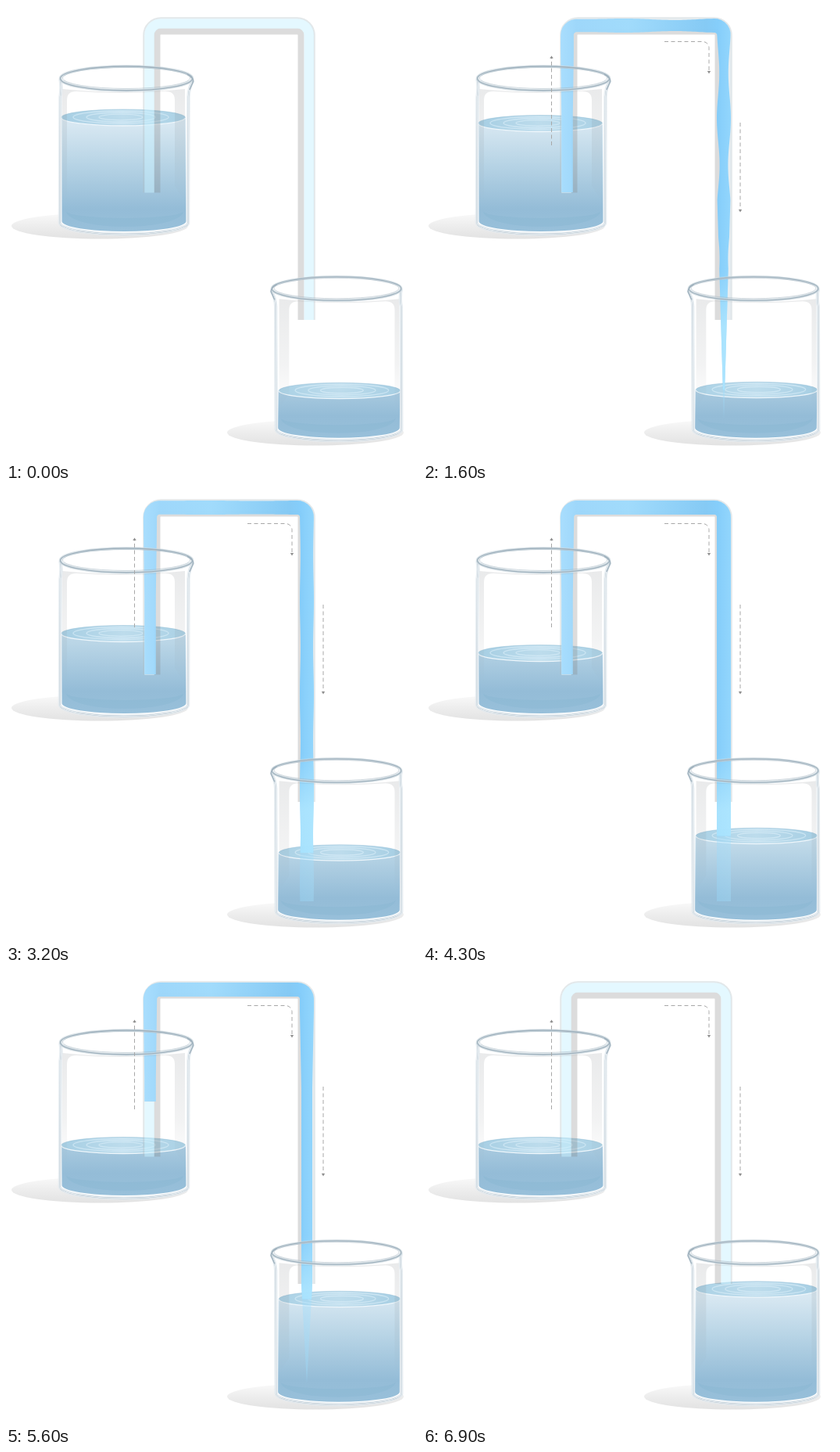
These frames come from a looping animation (526x580 px, 7200 ms). An HTML page with a canvas:

```html
<!DOCTYPE html>
<html lang="en">
<head>
<meta charset="utf-8">
<title>Siphon</title>
<style>
html, body { margin: 0; width: 100%; height: 100%; overflow: hidden; background: #fff; }
canvas { display: block; }
</style>
</head>
<body>
<canvas id="stage" width="526" height="580"></canvas>
<script>
const c = document.getElementById('stage').getContext('2d');
const LOOP = 7200, PI = Math.PI;
const FLIP_SCALE = 0.975, FLIP_Y = 270.9;   // the lower beaker is a mirrored copy
const clamp = (v, a = 0, b = 1) => Math.min(b, Math.max(a, v));

const upperLevel = [[1200, 142.5], [1600, 150], [2400, 166.5], [3200, 186], [4300, 211], [5000, 224]];
const lowerLevel = [[1500, 491.5], [1600, 490.5], [2400, 479.5], [3200, 466], [4300, 444.5], [5600, 420.5], [6300, 408]];

function track(keys, t) {
  if (t <= keys[0][0]) return keys[0][1];
  for (let i = 1; i < keys.length; i++) {
    const [t0, a] = keys[i - 1], [t1, b] = keys[i];
    if (t < t1) return a + (b - a) * (t - t0) / (t1 - t0);
  }
  return keys[keys.length - 1][1];
}

function gradient(x0, y0, x1, y1, ...stops) {
  const g = c.createLinearGradient(x0, y0, x1, y1);
  stops.forEach(([at, color]) => g.addColorStop(at, color));
  return g;
}

function fill(color) { c.fillStyle = color; c.fill(); }
function stroke(color, width) { c.strokeStyle = color; c.lineWidth = width; c.stroke(); }
function oval(x, y, rx, ry, a = 0, b = 2 * PI) {
  c.beginPath();
  c.ellipse(x, y, rx, ry, 0, a, b);
}

function mirrored(draw) {
  c.save();
  c.transform(-0.979, 0, 0, FLIP_SCALE, 573.8, FLIP_Y);
  draw();
  c.restore();
}

function shadow(dx, dy) {
  oval(120 + dx, 281 + dy, 113, 16.5);
  fill(gradient(0, 264 + dy, 0, 298 + dy, [0, '#fafafa'], [0.5, '#ededed'], [1, '#e2e2e2']));
}

function water(y) {
  c.beginPath();
  c.moveTo(71, y);
  c.lineTo(71.5, 275);
  c.ellipse(151, 275, 79.5, 13, 0, PI, 0, true);
  c.lineTo(230, y);
  fill(gradient(0, 150, 0, 290, [0, '#d8e8f2'], [0.35, '#b9d5e6'], [0.78, '#94bcd7'], [1, '#98c0da']));

  c.beginPath();
  c.moveTo(77, 262);
  c.ellipse(152, 262, 75, 20, 0, PI, 0, true);
  c.ellipse(152, 262, 75, 9, 0, 0, PI);
  fill('rgba(115,165,200,.16)');

  oval(150, y, 79.5, 10.5);
  fill(gradient(70, 0, 230, 0, [0, '#a6cee3'], [0.5, '#bddcec'], [1, '#aad1e5']));
  for (const [rx, ry] of [[61, 8], [44, 6], [28, 3.8]]) {
    oval(147, y - 0.5, rx, ry);
    stroke('rgba(222,241,250,.6)', 1.3);
  }
  oval(150, y, 79.5, 10.5, 0, PI);
  stroke('#eef6fb', 1.3);
  oval(150, y, 79.5, 10.5, PI, 0);
  stroke('rgba(135,182,208,.5)', 0.8);
}

function bodyPath() {
  c.beginPath();
  c.moveTo(69.5, 93);
  c.quadraticCurveTo(71.5, 104, 69.5, 116);
  c.lineTo(69, 277);
  c.ellipse(151, 277, 82, 14.5, 0, PI, 0, true);
  c.lineTo(233.5, 116);
  c.quadraticCurveTo(234, 104, 239.5, 95);
}

function glass() {
  // soft reflections along both walls
  c.beginPath();
  c.moveTo(72, 270); c.lineTo(72, 106);
  c.quadraticCurveTo(151, 114, 229, 106);
  c.lineTo(229, 250); c.lineTo(216, 230); c.lineTo(216, 120);
  c.quadraticCurveTo(216, 109, 204, 109);
  c.quadraticCurveTo(145, 113, 90, 109);
  c.quadraticCurveTo(78, 109, 78, 120);
  c.lineTo(78, 250);
  fill(gradient(0, 105, 0, 250, [0, 'rgba(120,125,130,.16)'], [0.6, 'rgba(130,135,140,.1)'], [1, 'rgba(130,135,140,0)']));

  bodyPath();
  stroke('rgba(226,234,239,.75)', 4.5);
  stroke('#a9bac5', 1.4);
  bodyPath();
  c.save();
  c.translate(1.8, -1.6);
  c.scale(0.985, 1);
  stroke('rgba(250,253,255,.75)', 1.2);
  c.restore();

  oval(154, 92.5, 84.5, 15.5);
  stroke('rgba(205,216,223,.75)', 3.6);
  stroke('#a0b2be', 1.3);
  oval(154, 92, 81.5, 13.5);
  stroke('rgba(165,182,193,.6)', 0.9);
  c.beginPath();
  c.moveTo(232, 87);
  c.quadraticCurveTo(242, 93, 239, 98);
  c.lineTo(235, 107);
  stroke('#a0b2be', 1.5);
}

function pipe(left, top, right, radius, color, width) {
  c.beginPath();
  c.moveTo(left, 238.5);
  c.arcTo(left, top, right, top, radius);
  c.arcTo(right, top, right, 401, radius);
  c.lineTo(right, 401);
  stroke(color, width);
}

function tube(tail, end) {
  pipe(193.5, 32.5, 377.5, 4.5, 'rgba(125,125,125,.27)', 8);
  const outer = (color, width = 12.5) => pipe(183.5, 22.5, 387.8, 14.5, color, width);
  outer('rgba(202,241,255,.5)');
  if (end > tail) {   // the wet stretch turns grey
    c.setLineDash([end - tail, 2000]);
    c.lineDashOffset = -tail;
    outer('rgba(233,235,237,.8)');
    c.setLineDash([]);
    c.lineDashOffset = 0;
  }
  pipe(176.2, 15.2, 394.8, 22, 'rgba(175,190,195,.35)', 2);
}

// Centre line of the stream: up, across and down, with rounded corners.
const BEND = 12, ARC = BEND * PI / 2, UP = 201, ACROSS = 177, DOWN = 491;
const PATH = UP + ACROSS + DOWN + 2 * ARC, OUTLET = PATH - 127;

function along(s) {
  if (s < UP) return [184.5, 238 - s, -PI / 2];
  s -= UP;
  if (s < ARC) {
    const a = s / BEND;
    return [196.5 - BEND * Math.cos(a), 37 - BEND * Math.sin(a), a - PI / 2];
  }
  s -= ARC;
  if (s < ACROSS) return [196 + s, 25, 0];
  s -= ACROSS;
  if (s < ARC) {
    const a = s / BEND;
    return [373 + BEND * Math.sin(a), 37 - BEND * Math.cos(a), a];
  }
  return [385, 37 + s - ARC, PI / 2];
}

function halfWidth(s, t, head) {
  const full = 7.3 + 1.7 * clamp((s - 100) / 120);
  const swing = 3.6 * clamp((3800 - t) / 2200);
  const wave = swing * (0.5 + 0.5 * Math.cos((s - 582 - (t - 1600) * 0.15) * 2 * PI / 120));
  const ending = clamp((t - 4700) / 900);
  const thin = 2 * ending * clamp((s - 430) / 100);
  const drip = 1 - ending * clamp((s - OUTLET) / (PATH - OUTLET));
  return Math.max(0, Math.min(full - wave * clamp((s - 150) / 350) - thin, 0.03 * (head - s))) * drip;
}

function stream(t, surface, tail, end, head) {
  if (end <= tail) return;

  const one = [], other = [];
  for (let s = tail; ; s = Math.min(s + 3, end)) {
    const [x, y, a] = along(s), w = halfWidth(s, t, head);
    one.push([x - w * Math.sin(a), y + w * Math.cos(a)]);
    other.unshift([x + w * Math.sin(a), y - w * Math.cos(a)]);
    if (s >= end) break;
  }
  const shape = new Path2D();
  one.concat(other).forEach(([x, y]) => shape.lineTo(x, y));

  const blue = gradient(175, 0, 395, 0, [0, '#a6ddfe'], [0.1, '#9ad6fb'], [0.4, '#9ddafc'],
    [0.85, '#80c8f5'], [0.92, '#80ccfb'], [1, '#8fd5fd']);
  const pale = gradient(0, 340, 0, 410, [0, 'rgba(185,236,255,0)'], [1, 'rgba(185,236,255,.7)']);
  const part = (y, h, alpha) => {
    c.save();
    c.beginPath();
    c.rect(0, y, 526, h);
    c.clip();
    c.globalAlpha = alpha;
    for (const color of [blue, pale]) {
      c.fillStyle = color;
      c.fill(shape);
    }
    c.restore();
  };
  part(0, surface, 0.95);
  part(surface, 580 - surface, 0.25);
}

function arrow(x, y, dir, line) {
  c.beginPath();
  line();
  c.setLineDash([5, 3.5]);
  stroke('#a8a8a8', 1);
  c.setLineDash([]);
  c.beginPath();
  c.moveTo(x - 2.2, y - 3.5 * dir);
  c.lineTo(x, y);
  c.lineTo(x + 2.2, y - 3.5 * dir);
  fill('#909090');
}

function arrows(t) {
  if (t >= 500) arrow(164.5, 63.5, -1, () => { c.moveTo(164.5, 178); c.lineTo(164.5, 66); });
  if (t >= 800) arrow(366, 86.5, 1, () => {
    c.moveTo(309, 45.5);
    c.arcTo(366, 45.5, 366, 84, 8);
    c.lineTo(366, 84);
  });
  if (t >= 1100) arrow(406, 263.5, 1, () => { c.moveTo(406, 149); c.lineTo(406, 261); });
}

function draw(t) {
  const low = track(lowerLevel, t);
  const head = (t - 250) * 0.672;
  const tail = Math.max(0, (t - 5500) * 0.7);
  const end = Math.min(head, PATH);
  c.fillStyle = '#fff';
  c.fillRect(0, 0, 526, 580);
  shadow(0, 0);
  shadow(276, 264);
  // white interiors hide the shadows behind the glass
  const interior = () => { bodyPath(); fill('#fff'); };
  interior();
  mirrored(interior);
  water(track(upperLevel, t));
  mirrored(() => water((low - FLIP_Y) / FLIP_SCALE));
  tube(tail, end);
  stream(t, low, tail, end, head);
  glass();
  mirrored(glass);
  arrows(t);
}

const start = performance.now();
function tick() {
  const t = Math.floor((performance.now() - start) % LOOP / 100) * 100;
  draw(t < 300 ? 0 : Math.min(t, 6900));
  requestAnimationFrame(tick);
}
tick();
</script>
</body>
</html>
```
